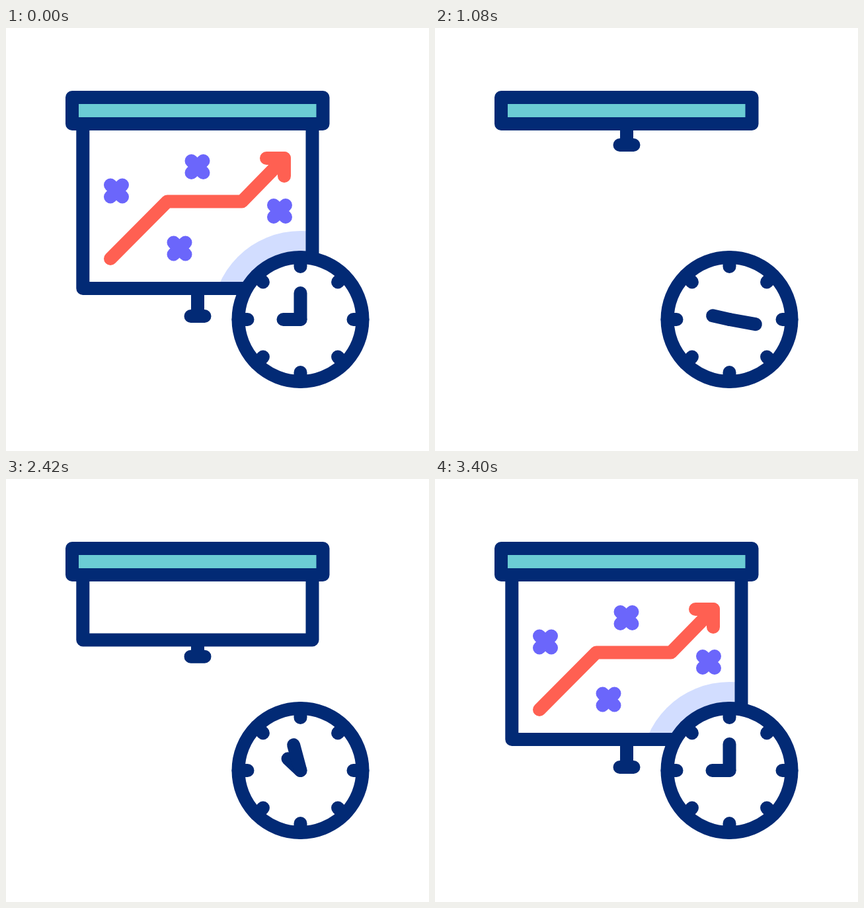
Write an HTML page that moves like this. It is 640 px wide and 640 px high and loops after 3.6 s.

```html
<!DOCTYPE html>
<html lang="en">
<head>
<meta charset="utf-8">
<title>Presentation timing</title>
<style>
  html, body { margin: 0; height: 100%; overflow: hidden; background: #fff; }
  svg { display: block; width: 100%; height: 100%; }
  svg * { stroke-linecap: round; stroke-linejoin: round; }
  .navy { stroke: #022a75; stroke-width: 20; fill: none; }
  .coral { stroke: #ff6052; stroke-width: 20; fill: none; }
  .flower { stroke: #6b66fb; stroke-width: 20; fill: none; }
</style>
</head>
<body>
<svg viewBox="0 0 640 640">
  <clipPath id="screen"><rect id="screenArea" x="116" y="125" width="347"/></clipPath>
  <path id="handle" class="navy" d="M290 376V436M279.5 436H300.5"/>
  <rect id="paper" x="116.3" y="125" width="347.2" fill="#fff"/>
  <g clip-path="url(#screen)">
    <circle cx="445.5" cy="441" r="134" fill="#d2ddff"/>
    <g id="chart">
      <path id="line" class="coral" pathLength="1" d="M158 349L244 262.5H357L421 197"/>
      <path id="head" class="coral"/>
    </g>
  </g>
  <rect id="frame" class="navy" x="116.3" y="125" width="347.2"/>
  <rect class="navy" x="100" y="105" width="379.5" height="40" style="fill:#6bccd4"/>
  <g id="clock" transform="translate(445.5 441)">
    <circle class="navy" r="94" style="fill:#fff"/>
    <path id="hour" class="navy" d="M0 0V-26"/>
    <path id="minute" class="navy" d="M0 0V-40"/>
  </g>
</svg>
<script>
const LOOP = 3600;
const $ = id => document.getElementById(id);
const set = (id, name, value) => $(id).setAttribute(name, value);

function addPath(parent, className, d, transform = '') {
  const path = document.createElementNS('http://www.w3.org/2000/svg', 'path');
  path.setAttribute('class', className);
  path.setAttribute('d', d);
  path.setAttribute('transform', transform);
  return $(parent).appendChild(path);
}

for (let angle = 0; angle < 360; angle += 45) {
  addPath('clock', 'navy', 'M0 -94V-80', `rotate(${angle})`);
}

const flowers = [[167, 246.5], [262.5, 333.5], [289.5, 210], [414, 277]]
  .map(([x, y]) => ({ x, y, path: addPath('chart', 'flower', 'M-9 -9L9 9M9 -9L-9 9') }));

// Eased progress from 0 to 1 between two times
function ease(t, start, end) {
  const u = Math.min(1, Math.max(0, (t - start) / (end - start)));
  return u * u * (3 - 2 * u);
}

function draw(t) {
  const rolled = ease(t, 267, 1133) - ease(t, 2022, 2889);
  const pulled = ease(t, 400, 1033) - ease(t, 2167, 2800);
  const height = 269 * (1 - rolled);
  for (const id of ['screenArea', 'paper', 'frame']) set(id, 'height', height);
  set('chart', 'transform', `translate(0 ${-295 * rolled})`);
  set('handle', 'transform', `translate(0 ${-259 * pulled})`);

  // The chart stays whole while rolling up, then is drawn anew
  const grow = (start, end) => t < 1200 ? 1 : ease(t, start, end);
  const drawn = grow(2500, 3233);
  set('line', 'visibility', drawn ? 'visible' : 'hidden');
  set('line', 'stroke-dasharray', drawn < 1 ? `${drawn} 2` : 'none');
  const arm = 27 * grow(3167, 3400);
  set('head', 'd', arm ? `M${421 - arm} 197H421V${197 + arm}` : '');
  flowers.forEach(({ x, y, path }, i) => {
    const scale = grow(2733 + i * 100, 3067 + i * 100);
    path.setAttribute('transform', `translate(${x} ${y}) scale(${scale})`);
  });

  const turn = ease(t, 200, 2733);
  set('minute', 'transform', `rotate(${360 * turn})`);
  set('hour', 'transform', `rotate(${270 + 45 * (turn - ease(t, 2733, 3400))})`);
}

function tick() {
  draw(performance.now() % LOOP);
  requestAnimationFrame(tick);
}
tick();
</script>
</body>
</html>
```
